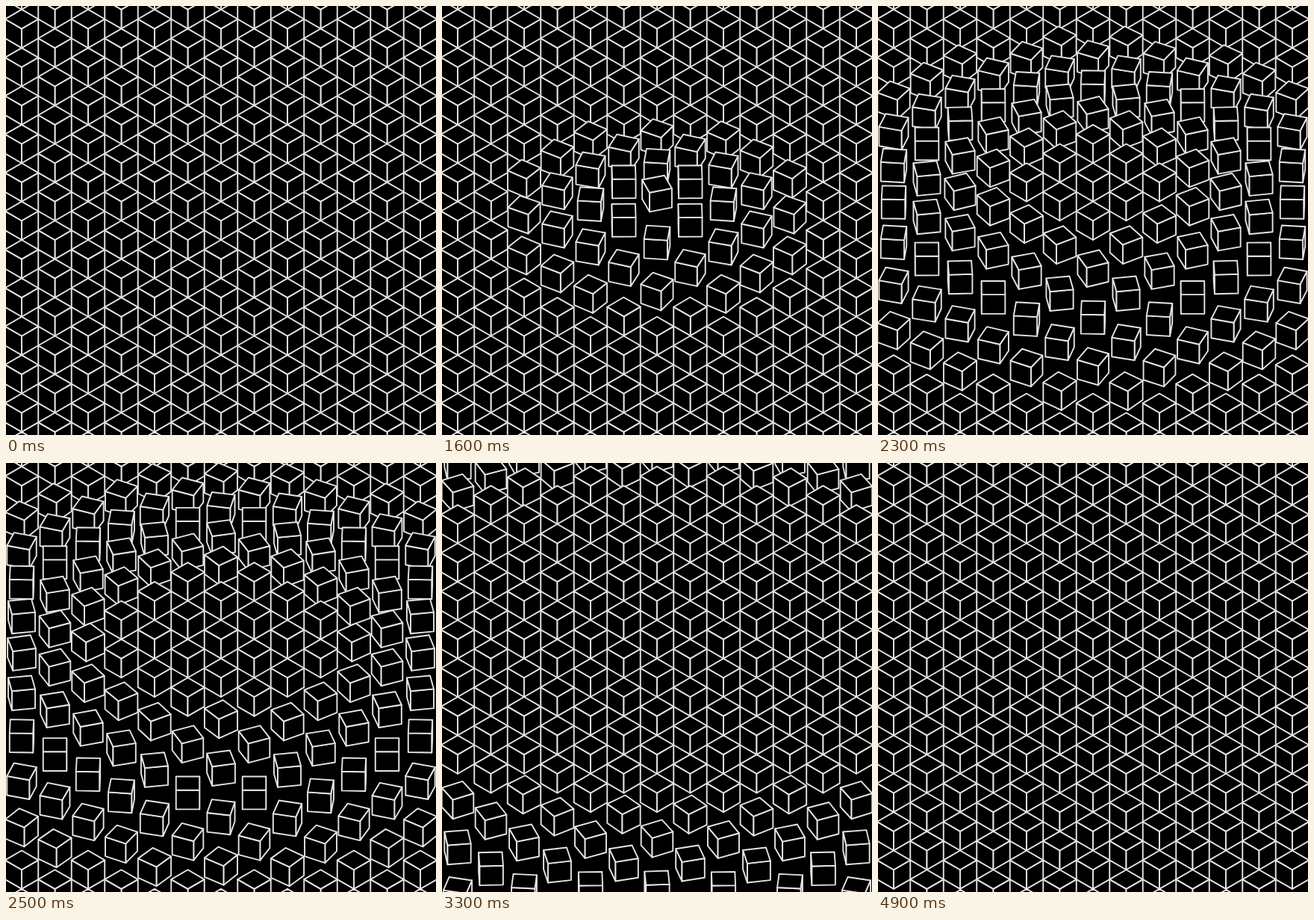
Recreate the animation shown at these times as an HTML page with a canvas. Size 576 by 574 pixels, loop 5 s.

```html
<!DOCTYPE html>
<html lang="en">
<head>
<meta charset="utf-8">
<title>Cube ripple</title>
<style>
  html, body { margin: 0; height: 100%; overflow: hidden; background: #000; }
  canvas { display: block; }
</style>
</head>
<body>
<canvas id="stage" width="576" height="574"></canvas>
<script>
const ctx = document.getElementById('stage').getContext('2d');
const LOOP = 5000, STEP = 100;
const CX = 288, CY = 287.3;
const COL = 44.5;                // column spacing
const R = COL / 2;               // half diagonal of a cube's top face
const EDGE = COL / Math.sqrt(3); // projected height of a vertical edge
const TILT = 1 / Math.sqrt(3);   // vertical squash of the floor plane
const RAMP = 0.137;              // progress per column of distance

// Wave radius, in columns, over time; it slows down near the end.
const WAVE = [[0, -8.5], [775, -3.65], [1600, 1.5], [2000, 4.04], [2500, 7.07],
  [3300, 12.28], [3700, 14.5], [4100, 16.2], [4500, 17.5], [5000, 18.2]];

function waveRadius(t) {
  const i = WAVE.findIndex(p => p[0] > t);
  const [t0, r0] = WAVE[i - 1], [t1, r1] = WAVE[i];
  return r0 + (r1 - r0) * (t - t0) / (t1 - t0);
}

function polygon(points) {
  ctx.beginPath();
  for (const [x, y] of points) ctx.lineTo(x, y);
  ctx.closePath();
  ctx.fill();
  ctx.stroke();
}

function drawCube(x, y, turn) {
  const top = [0, 1, 2, 3].map(i => {
    const a = turn + i * Math.PI / 2;
    return [x + R * Math.sin(a), y - EDGE / 2 + R * TILT * Math.cos(a)];
  });
  top.forEach((p, i) => {
    const q = top[(i + 1) % 4];
    const facing = Math.cos(turn + (i + 0.5) * Math.PI / 2);
    if (facing > 1e-6) polygon([p, q, [q[0], q[1] + EDGE], [p[0], p[1] + EDGE]]);
  });
  polygon(top);
}

function draw(t) {
  const radius = waveRadius(t);
  ctx.fillStyle = '#000';
  ctx.fillRect(0, 0, 576, 574);
  ctx.strokeStyle = '#e4e4e4';
  ctx.lineWidth = 1.9;
  ctx.lineJoin = 'round';
  // Back to front; each cube turns a quarter while sliding one row up.
  for (let row = -14; row <= 16; row++) {
    for (let col = -7; col <= 7; col++) {
      if ((row + col) % 2) continue;
      const p = Math.min(1, Math.max(0, 0.5 + RAMP * (radius - Math.hypot(col, row))));
      drawCube(CX + col * COL, CY + (row - 2 * p) * EDGE, p * Math.PI / 2);
    }
  }
}

const start = performance.now();
function frame() {
  const t = (performance.now() - start) % LOOP;
  draw(Math.floor(t / STEP) * STEP);
  requestAnimationFrame(frame);
}
frame();
</script>
</body>
</html>
```
